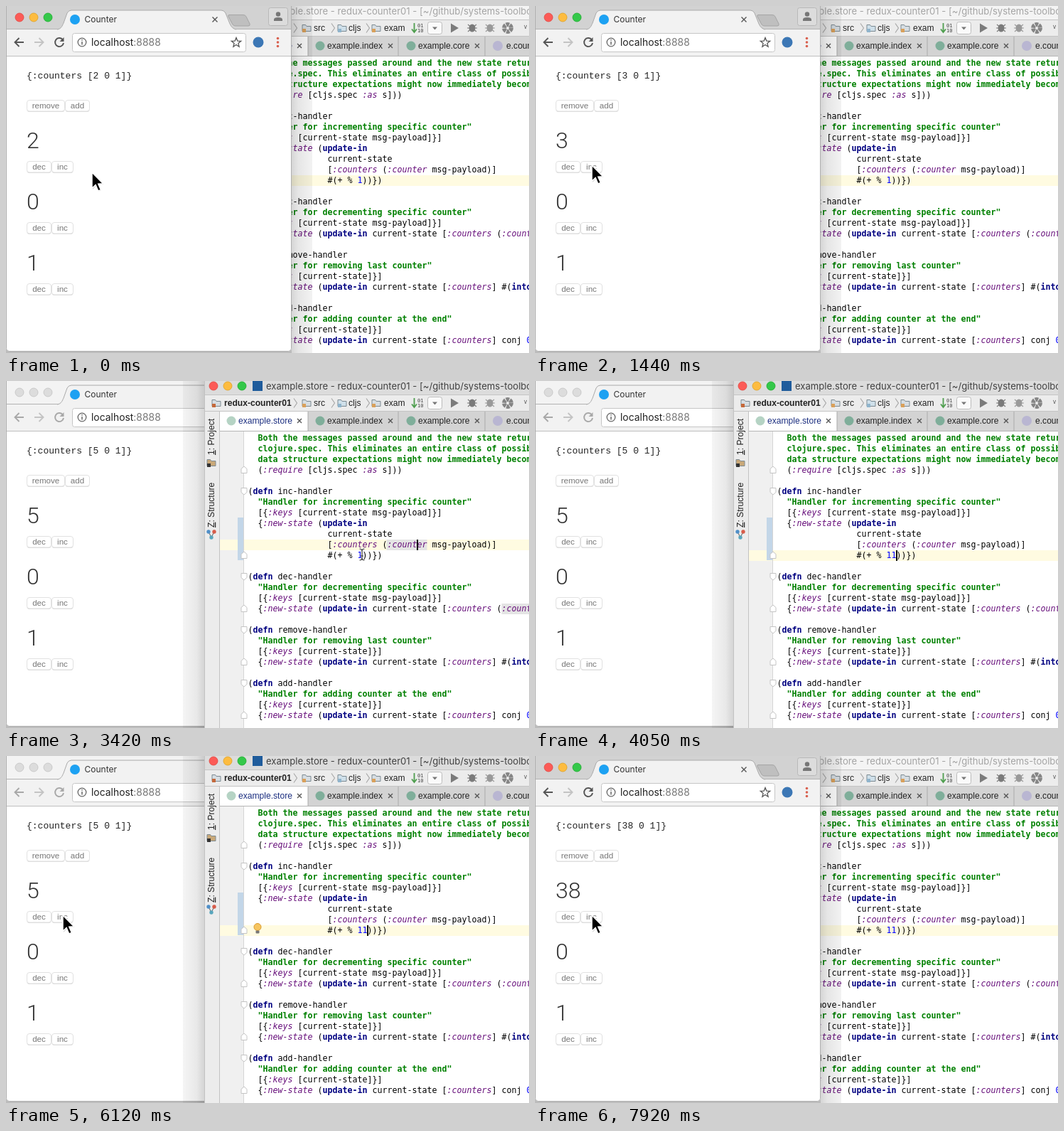
Animation, 736 px wide and 488 px high, one loop 8 s. Source, as an HTML page:

```html
<!DOCTYPE html>
<html lang="en">
<head>
<meta charset="utf-8">
<title>Counter</title>
<style>
  html, body { margin: 0; width: 100%; height: 100%; overflow: hidden; background: #c4c4c4; }
  svg { display: block; width: 736px; height: 488px; }
  text { white-space: pre; }
  .ui { font-family: Inter, Roboto, sans-serif; }
  .ide { font: 12.1px "Liberation Sans", Arial, sans-serif; fill: #222; }
  .project { font-weight: bold; }
  .current { fill: #1c2f80; }
  .code { font: 11.63px "DejaVu Sans Mono", monospace; fill: #000; }
  .tiny { font: 7px "DejaVu Sans Mono", monospace; fill: #444; }
  .doc { font-weight: bold; fill: #008000; }
  .key { font-style: italic; fill: #660e7a; }
  .fn { font-weight: bold; fill: #000080; }
  .num { fill: #0000ff; }
  .state { font: 13px "Liberation Mono", monospace; fill: #222; }
  .count { font: 300 32px Roboto, sans-serif; fill: #333; }
  .btn { font: 11.6px "Liberation Sans", Arial, sans-serif; fill: #777; text-anchor: middle; }
</style>
</head>
<body>
<svg id="stage" viewBox="0 0 736 488">
  <defs>
    <linearGradient id="shadeRight">
      <stop offset="0" stop-color="#000" stop-opacity=".17"/>
      <stop offset=".35" stop-color="#000" stop-opacity=".1"/>
      <stop offset="1" stop-color="#000" stop-opacity=".05"/>
    </linearGradient>
    <linearGradient id="shadeLeft" x1="1" x2="0">
      <stop offset="0" stop-color="#000" stop-opacity=".17"/>
      <stop offset=".35" stop-color="#000" stop-opacity=".09"/>
      <stop offset="1" stop-color="#000" stop-opacity=".04"/>
    </linearGradient>
  </defs>
  <g id="windows"><g id="ide"></g><g id="browser"></g></g>
  <g id="arrow">
    <path d="M1 2V24L6 19L9 27L13 25L10 17L17 17Z" fill="#000" opacity=".15"/>
    <path d="M0 0V22.2L5.1 17.5L8.7 26L12.4 24.4L8.8 16.2L15.6 15.8Z" fill="#000" stroke="#fff" stroke-width="1.5"/>
  </g>
  <g id="beam" fill="none">
    <path d="M-3.5 -8Q0 -8 0 -5V5Q0 8 -3.5 8M3.5 -8Q0 -8 0 -5V5Q0 8 3.5 8M-2 2H2" stroke="#fff" stroke-width="2.6"/>
    <path d="M-3.5 -8Q0 -8 0 -5V5Q0 8 -3.5 8M3.5 -8Q0 -8 0 -5V5Q0 8 3.5 8M-2 2H2" stroke="#333" stroke-width="1.2"/>
  </g>
</svg>
<script>
const $ = id => document.getElementById(id);
const rect = (x, y, w, h, fill, extra = "") =>
  `<rect x="${x}" y="${y}" width="${w}" height="${h}" fill="${fill}" ${extra}/>`;
const dot = (x, y, r, fill, extra = "") =>
  `<circle cx="${x}" cy="${y}" r="${r}" fill="${fill}" ${extra}/>`;
const path = (d, stroke, width = 1, fill = "none") =>
  `<path d="${d}" stroke="${stroke}" stroke-width="${width}" fill="${fill}"/>`;
const label = (x, y, s, cls, extra = "") =>
  `<text x="${x}" y="${y}" class="${cls}" ${extra}>${s}</text>`;
const cross = (x, y, r, color) =>
  path(`M${x - r} ${y - r}L${x + r} ${y + r}M${x + r} ${y - r}L${x - r} ${y + r}`, color, 1.4);
const lights = (x, y, name) =>
  [0, 1, 2].map(i => dot(x + 20 * i, y, 6, "#ddd", `class="${name}" stroke-width=".8"`)).join("");

const LIGHTS = ["#fc5b57", "#fdbc40", "#34c84a"];
const LIGHT_EDGES = ["#e0443e", "#dea123", "#1aab29"];
const ROW = 15, COL = 7, CODE_X = 340.5, CODE_Y = 80;
const colX = col => CODE_X + COL * col;
const rowY = row => CODE_Y + ROW * row;
const rowTop = row => rowY(row) - 7;

// Source code shown in the editor, one entry per row.
const defn = (name, doc, args, ...body) =>
  [`(defn ${name}`, `  "${doc}"`, `  [{:keys [${args}]}]`, ...body, ""];
const CODE = [
  "  Both the messages passed around and the new state returned",
  "  clojure.spec. This eliminates an entire class of possible",
  "  data structure expectations might now immediately become",
  "  (:require [cljs.spec :as s]))", "",
  ...defn("inc-handler", "Handler for incrementing specific counter", "current-state msg-payload",
    "  {:new-state (update-in", " ".repeat(16) + "current-state",
    " ".repeat(16) + "[:counters (:counter msg-payload)]", " ".repeat(16) + "#(+ % 1))})"),
  ...defn("dec-handler", "Handler for decrementing specific counter", "current-state msg-payload",
    "  {:new-state (update-in current-state [:counters (:counter"),
  ...defn("remove-handler", "Handler for removing last counter", "current-state",
    "  {:new-state (update-in current-state [:counters] #(into []"),
  ...defn("add-handler", "Handler for adding counter at the end", "current-state",
    "  {:new-state (update-in current-state [:counters] conj 0)})")
];
const span = (cls, s) => `<tspan class="${cls}">${s}</tspan>`;
function highlight(s, row) {
  if (row < 3) return span("doc", s);
  return s.replace(/("[^"]*")|(:[\w-]+)|\b(defn|update-in|into)\b|\b(\d+)\b/g,
    (m, doc, key, fn) => span(doc ? "doc" : key ? "key" : fn ? "fn" : "num", m));
}
const codeLine = (s, row) => {
  const indent = s.search(/\S|$/);
  return label(colX(indent), rowY(row) + 4.3, highlight(s.trim(), row), "code", `id="row${row}"`);
};

const folder = (x, y, mark, fill = "#d6dde2") =>
  path(`M${x - 6} ${y - 4.5}h4.5l1.5 2h6v7h-12z`, "#7d8a92", 1, fill) +
  rect(x - 6, y + 1, 5, 5, mark);
const chevron = x => path(`M${x - 2} 24.5L${x + 2.5} 31L${x - 2} 37.5`, "#a5a5a5", 1.1);
const fold = (row, end) => {
  const y = rowY(row);
  return end ? path(`M331 ${y + 4.5}v-6l4-3.5l4 3.5v6z`, "#c4c4c4", 1, "#fff")
             : path(`M331 ${y - 4.5}v6l4 3.5l4 -3.5v-6z`, "#c4c4c4", 1, "#fff");
};
const tab = (x, name, close, end, active) =>
  (active ? rect(300, 43, end - 300, 27, "#fff") : "") +
  dot(x - 10, 56, 6.5, active ? "#b5d3c4" : "#7fae9a") +
  label(x, 60, name, active ? "ide current" : "ide") + cross(close, 56, 3, "#555") +
  path(`M${end} 43V70`, "#aaa");

function bug(x, color) {
  return `<ellipse cx="${x}" cy="31" rx="4.5" ry="5.5" fill="${color}"/>` +
    path(`M${x - 6} 26l12 10M${x + 6} 26l-12 10M${x - 7} 31h14`, color, 1.2);
}

function drawIde() {
  const sidebarText = (y, s) =>
    `<text class="ide" transform="translate(293 ${y}) rotate(-90)"><tspan text-decoration="underline">${s[0]}</tspan>${s.slice(1)}</text>`;
  $("ide").innerHTML =
    rect(249, 0, 30, 488, "url(#shadeLeft)") +
    rect(279, 0, 457, 488, "#fff") +
    rect(279, 0, 457, 19, "#ddd", 'id="ideTitleBar"') +
    lights(292, 7, "ideLight") + rect(347, 0, 14, 14, "#1f5c9c") +
    label(366, 12.3, "example.store - redux-counter01 - [~/github/systems-toolbox", "ui", 'font-size="13.1" id="ideTitle"') +
    rect(279, 19, 457, 24, "#ececec") + path("M279 19.5H736M279 42.5H736", "#c4c4c4") +
    folder(296, 31, "#c4683a") + label(307, 35, "redux-counter01", "ide project") +
    chevron(407) + folder(423, 31, "#d9a05a") + label(433, 35, "src", "ide") +
    chevron(460) + folder(473, 31, "#8fb4cc", "#cfe0ea") + label(482, 35, "cljs", "ide") +
    chevron(509) + folder(521, 31, "#d9a05a") + label(532, 35, "exam", "ide") +
    path("M574.5 24V36M571 32.5L574.5 37L578 32.5", "#4f9e4f", 1.8) +
    label(579, 30, "01", "tiny") + label(579, 37, "10", "tiny") +
    rect(593.5, 22.5, 20, 17, "#fafafa", 'rx="3" stroke="#bbb"') +
    path("M600 29.5h7l-3.5 4z", "none", 0, "#777") +
    path("M626 24.5V37.5L637 31Z", "none", 0, "#7b7b7b") +
    bug(656, "#7b7b7b") + bug(681, "#9a9a9a") +
    dot(706, 31, 5, "none", 'stroke="#858585" stroke-width="6" stroke-dasharray="4.2 1"') +
    label(729, 32, "V", "tiny") +
    rect(279, 43, 457, 27, "#d3d3d3") +
    tab(327, "example.store", 413, 425, true) + tab(452, "example.index", 541, 552) +
    tab(580, "example.core", 663, 674) + dot(692, 56, 7, "#b9b6d2") + label(704, 60, "e.counter", "ide") +
    path("M300 70.5H736", "#b5b5b5") +
    rect(279, 43, 21, 445, "#ececec") + path("M300.5 43V488M279.5 0V488", "#c2c2c2") +
    sidebarText(104, "1: Project") + folder(289, 115, "#333", "#c9a878") +
    sidebarText(206, "Z: Structure") +
    path("M285 212L289 220L293 212", "#777", 1.2) +
    dot(285, 212, 2.7, "#4f8fc8") + dot(293, 212, 2.7, "#d85c4a") + dot(289, 220, 2.7, "#58a6bd") +
    rect(301, 71, 33, 417, "#f0f0f0") +
    rect(301, 0, 435, ROW, "#fffbe1", 'id="activeRow"') +
    rect(326, 192, 8, 60, "#c3d6e8") +
    path("M334.5 71V488", "#d4d4d4") +
    `<g id="usages">${rect(535.5, rowTop(10), 57, ROW, "#e4e4e4")}${rect(697.5, rowTop(16), 39, ROW, "#e4e4e4")}</g>` +
    [5, 13, 18, 23].map(r => fold(r)).join("") +
    [3, 11, 16, 21, 26].map(r => fold(r, true)).join("") +
    CODE.map(codeLine).join("") +
    `<g id="bulb">${dot(354, 240.5, 5, "#f6c560", 'stroke="#d9982b" stroke-width="1"')}${rect(351.5, 245.5, 5, 4, "#777", 'rx="1"')}</g>` +
    rect(0, 0, 2, ROW, "#000", 'id="caret"');
}

const button = (x, y, w, s) =>
  rect(x + .5, y + 1, w - 1, 16, "#ddd", 'rx="3.5"') +
  rect(x + .5, y + .5, w - 1, 15.5, "#fff", 'rx="3.5" stroke="#dedede" stroke-width=".9"') +
  label(x + w / 2, y + 12.3, s, "btn");

function drawBrowser() {
  const counter = (n, i) => label(29, 200 + 86 * i, n, "count", `id="count${i}"`) +
    button(29, 218 + 86 * i, 35, "dec") + button(64, 218 + 86 * i, 31, "inc");
  const star = Array.from({ length: 10 }, (_, i) => {
    const r = i % 2 ? 3 : 7, a = Math.PI * (i / 5 - .5);
    return `${(324 + r * Math.cos(a)).toFixed(1)} ${(51.5 + r * Math.sin(a)).toFixed(1)}`;
  }).join("L");
  $("browser").innerHTML =
    rect(401, 0, 30, 488, "url(#shadeRight)") +
    rect(0, 484, 402, 4, "#bcbcbc") +
    rect(.5, -5, 401, 490.5, "#fff", 'rx="4" stroke="#b0b0b0"') +
    rect(1, 0, 400, 33, "#d2d2d2", 'id="tabStrip"') +
    lights(19, 16, "browserLight") +
    rect(1, 33, 400, 37, "#f2f2f2") + path("M1 32.5H401", "#b3b3b3") +
    path("M72 33C78 32 79 28 81 24L86 10Q88 6 92 6H303Q307 6 309 10L315 25Q318 32 324 33", "#aaa", 1, "#f2f2f2") +
    dot(97, 19, 7, "#1da1f2") +
    label(110.5, 23.3, "Counter", "ui", 'font-size="12" fill="#333"') + cross(294, 19, 3.5, "#555") +
    path("M314 12.5H334Q337 12.5 338 15L343 25Q344 28 341 28H323Q320 28 319 26L313 15Q312 12.5 314 12.5Z", "#a5a5a5", 1, "#bfbfbf") +
    rect(369.5, 2.5, 27, 25, "#dcdcdc", 'rx="3" stroke="#b8b8b8"') +
    dot(383, 11.5, 3.2, "#777") + path("M377 21V19Q377 16 383 16Q389 16 389 19V21Z", "none", 0, "#777") +
    path("M25 51H13M18.5 45L12.5 51L18.5 57", "currentColor", 1.9) +
    path("M40 51H52M46.5 45L52.5 51L46.5 57", "#c4c4c4", 1.9) +
    path("M79.5 47A6 6 0 1 0 81 52", "currentColor", 1.9) + path("M81.5 44V50H75.5Z", "none", 0, "currentColor") +
    rect(93.5, 38.5, 244, 26, "#fff", 'rx="3" stroke="#c6c6c6"') +
    dot(107, 51, 5.8, "none", 'stroke="#666" stroke-width="1.3"') + path("M107 50V54.5M107 47V48.6", "#666", 1.5) +
    label(120, 56, 'localhost<tspan fill="#777">:8888</tspan>', "ui", 'font-size="13.9" fill="#222"') +
    path(`M${star}Z`, "#555", 1.3) +
    dot(355, 51, 7.5, "#3c77b5") +
    [45.5, 51, 56.5].map(y => dot(382.5, y, 1.8, "#d9604f")).join("") +
    path("M1 70.5H401", "#c0c0c0") +
    label(29, 102, "", "state", 'id="state"') +
    button(29, 132, 54, "remove") + button(83, 132, 35, "add") +
    [2, 0, 1].map(counter).join("") +
    `<g id="badge">${dot(35, 451, 34, "#e3ebbd")}${dot(35, 451, 23, "#8cc98c")}</g>`;
}

// Timeline in milliseconds.
const LOOP = 8000, STEP = 90;
const COUNTS = [[0, 2], [1260, 3], [1710, 4], [2070, 5], [6660, 16], [7020, 27], [7380, 38]];
const POINTER = [
  [180, 121, 234], [720, 80, 224], [2160, 80, 224], [2610, 578, 226], [2880, 578, 226],
  [3330, 501, 244], [4860, 501, 244], [5040, 110, 270], [5130, 110, 270], [5580, 80, 224], [LOOP, 80, 224]
];
const within = (t, from, to) => t >= from && t < to;
const latest = (table, t) => table.filter(([at]) => at <= t).pop()[1];
const show = (id, on) => $(id).setAttribute("visibility", on ? "visible" : "hidden");

function pointerAt(t) {
  const i = POINTER.findIndex(([at]) => at >= t);
  if (i === 0) return POINTER[0].slice(1);
  const [t0, x0, y0] = POINTER[i - 1], [t1, x1, y1] = POINTER[i];
  const p = (t - t0) / (t1 - t0), k = p * p * (3 - 2 * p);
  return [x0 + (x1 - x0) * k, y0 + (y1 - y0) * k];
}

function paintLights(name, active) {
  document.querySelectorAll("." + name).forEach((el, i) => {
    el.setAttribute("fill", active ? LIGHTS[i] : "#dcdcdc");
    el.setAttribute("stroke", active ? LIGHT_EDGES[i] : "#c2c2c2");
  });
}

function render(time) {
  const t = Math.floor((time % LOOP) / STEP) * STEP;
  const ideActive = within(t, 2790, 6300);
  const front = $(ideActive ? "ide" : "browser");
  if ($("windows").lastElementChild !== front) $("windows").append(front);
  paintLights("ideLight", ideActive);
  paintLights("browserLight", !ideActive);
  $("browser").style.color = ideActive ? "#a8a8a8" : "#555";
  $("tabStrip").setAttribute("fill", ideActive ? "#f3f3f3" : "#d2d2d2");
  $("ideTitleBar").setAttribute("fill", ideActive ? "#dcdcdc" : "#f4f4f4");
  $("ideTitle").setAttribute("fill", ideActive ? "#404040" : "#a4a4a4");

  const count = latest(COUNTS, t);
  $("count0").textContent = count;
  $("state").textContent = `{:counters [${count} 0 1]}`;

  const typed = t >= 4050, onUsage = within(t, 2880, 3600);
  const row = onUsage ? 10 : 11;
  $("row11").innerHTML = highlight(`#(+ % ${typed ? 11 : 1}))})`, 11);
  $("activeRow").setAttribute("y", rowTop(row));
  $("caret").setAttribute("x", colX(onUsage ? 34 : typed ? 24 : 23) - .5);
  $("caret").setAttribute("y", rowTop(row));
  show("caret", ideActive && t % 1000 < 500);
  show("usages", onUsage);
  show("bulb", within(t, 5490, 6300));
  show("badge", within(t, 4950, 5850));
  $("badge").setAttribute("opacity", t < 5670 ? 1 : (5850 - t) / 180);

  const at = `translate(${pointerAt(t)})`;
  const beam = within(t, 2880, 4950);
  $("arrow").setAttribute("transform", at);
  $("beam").setAttribute("transform", at);
  show("arrow", !beam);
  show("beam", beam && !within(t, 3960, 4770));
}

drawIde();
drawBrowser();
const start = performance.now();
function tick() {
  render(performance.now() - start);
  requestAnimationFrame(tick);
}
tick();
</script>
</body>
</html>
```
